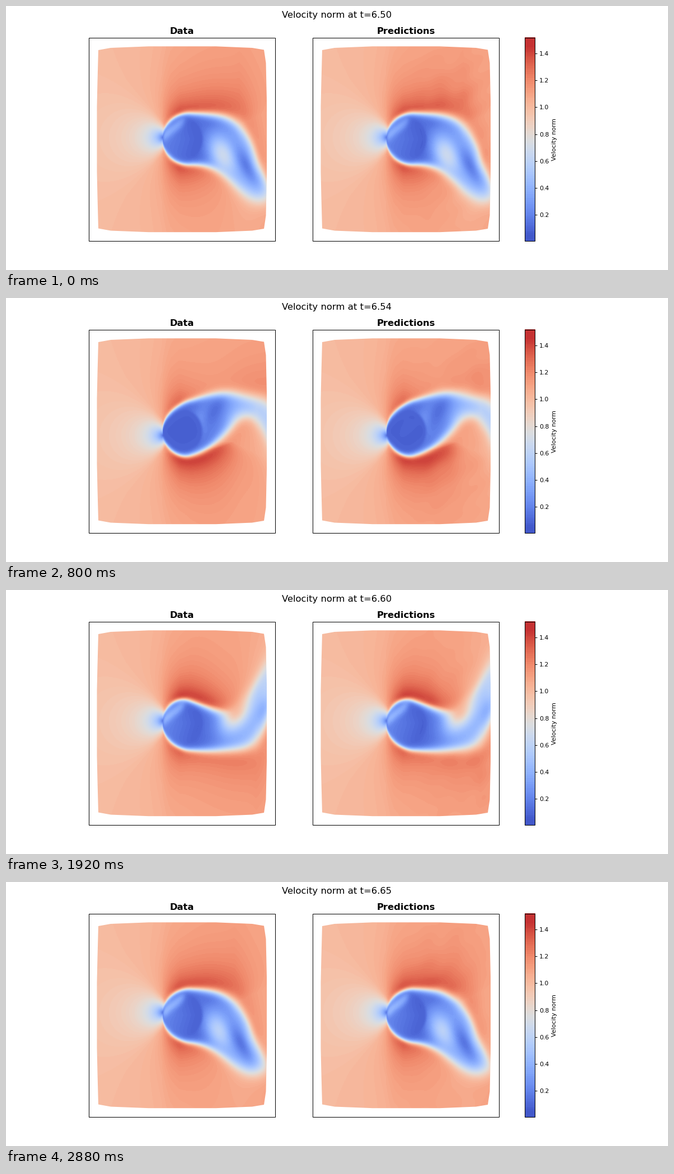
A matplotlib script for the animation above (3040 ms loop, 1183x473 px).

```python
import numpy as np
import matplotlib as mpl
import matplotlib.pyplot as plt
from matplotlib.animation import FuncAnimation
from matplotlib.colors import ListedColormap
from matplotlib.patches import Polygon, Rectangle

W, H, DPI = 1183, 473, 128
PX = 72 / DPI                      # points per pixel
FRAMES, STEP = 19, 160
HALF = 9.4                         # half a shedding cycle, in frames
VMIN, VMAX, BANDS = 0.0045, 1.5185, 100
CX, CY, R = 317, 238.5, 36         # cylinder
LEFT, WIDTH, SHIFT = 147.9, 333.4, 400
TOP, BOTTOM = 56.8, 420.9
BAR_L, BAR_R = 927.2, 945.4

x = np.arange(162, 468) + 0.5
y = np.arange(72, 406) + 0.5
X, Y = np.meshgrid(x, y)
UP = CY - Y
reach = np.clip((x - 290) / 170, 0, 1.1)     # 0 at the cylinder, 1 at the outlet

rng = np.random.default_rng(4)
WAVES = np.column_stack([rng.uniform(.04, .15, 9), rng.uniform(-.16, .16, 9),
                         rng.uniform(0, 2 * np.pi, 9)])


def sig(z):
    return 1 / (1 + np.exp(-z))


def beat(p, peak, period):
    return np.cos(2 * np.pi * (p - peak) / period)


def blob(v, x0, v0, lean, along, across):
    """Slanted Gaussian spot."""
    dx, dv = X - x0, (v - v0) * lean
    a, c = .45 * dx + .89 * dv, .89 * dx - .45 * dv
    return np.exp(-(a / along) ** 2 / 2 - (c / across) ** 2 / 2)


def free_stream(shift):
    """Potential flow past the cylinder, softened on the sides."""
    v = UP - shift * np.clip((310 - X) / 30, 0, 1)
    dx = X - CX
    z2 = (np.where(dx < 0, dx, .35 * dx) + 1j * v * R / 38) ** 2
    w = np.abs(1 - R**2 * np.conj(z2) / np.maximum(np.abs(z2), R**2) ** 2)
    slow = np.where(dx < 0, np.minimum(w, 1), 1)
    return slow + .35 * np.maximum(w - 1, 0) + .08 * sig((X - 290) / 25)


def wake_edges(p):
    """A travelling wave whose width pulses twice per cycle."""
    peak = HALF / 2 - .4 + 4.4 * reach**2
    middle = 86 * reach**1.9 * beat(p, peak, 2 * HALF)
    pulse = 24 * reach**1.3 * beat(p, 6.2 + 5.8 * reach**2, HALF)
    nose = np.sqrt(1 - np.clip((330 - x) / 50, 0, 1) ** 2)
    half = nose * (48 - 19 * reach**3 + pulse)
    return middle + half, middle - half


def crest(p):
    """Speed-up beside the wake, carried downstream."""
    wave = np.tanh(4 * reach) * beat(p, 4.3 + 8.4 * reach**1.5, 2 * HALF)
    return np.clip((x - 262) / 48, 0, 1) * (.19 - .15 * reach + .15 * wave)


def wake_speed(v, p):
    s = .1 + .4 * np.clip((X - 340) / 120, 0, 1.1) ** 1.2
    spot = np.exp(-((X - 355) / 16) ** 2 / 2 - ((v + 28) / 8) ** 2 / 2)
    s += (.12 - s) * spot * np.sin(np.pi * (p - 3) / HALF)
    for q, g in ((p, 1), (p + HALF, -1)):
        pale = np.clip(.3 + .11 * (q - 5.6), .3, 1.05)
        v0 = g * 28 * np.cos((q - 9) / 4.2)
        s += (pale - s) * .9 * blob(v, 388 + 9 * (q - 9.4), v0, g, 25, 15)
        dark = .08 + .07 * max(q - 9.4, 0)
        v0 = g * 52 * np.cos((q - 8.3) / 4.2)
        power = .85 * np.clip((q - 3) / 2.5, 0, 1)
        s += (dark - s) * power * blob(v, 400 + 13.5 * (q - 7), v0, g, 26, 10)
    return s


def body_speed(shift):
    lift = np.clip((shift + 4) / 8, 0, 1)
    slope = np.clip((345 - X - .3 * np.abs(UP)) / 60, 0, 1)
    ray = ((X - 303) * 23 - (UP - 22) * 30) / np.hypot(23, 30)
    streak = np.exp(-(ray / 6) ** 2 / 2) * sig((318 - X) / 3)
    return .08 + .13 * lift * slope + .22 * lift * streak


def fields(i):
    """Speed maps of the data and of the prediction."""
    turn, p = divmod(i - 3, HALF)
    p += 3
    side = 1 if turn % 2 == 0 else -1
    v = side * UP
    shift = -8 * side * beat(p, 5.8, 2 * HALF)

    upper, lower = wake_edges(p)
    over, under = (d / np.hypot(1, np.clip(np.gradient(e, x), -1, 1))
                   for d, e in ((v - upper, upper), (lower - v, lower)))
    soft = 2 + 6 * reach**1.3
    mask = sig(-over / soft) * sig(-under / soft) * (X > 280)

    above, below = (g * np.exp(-np.maximum(d, 0) / 45)
                    for g, d in ((crest(p + HALF), over), (crest(p), under)))
    share = sig((v - (upper + lower) / 2) / 8)
    glow = share * above + (1 - share) * below
    outer = free_stream(shift) + glow

    rho = np.hypot((X - 316) / 35, UP / 38.5)
    body = sig((1 - rho) * 25)
    inner = body * body_speed(shift) + (1 - body) * wake_speed(v, p)
    data = outer * (1 - mask) + inner * mask

    ripple = sum(np.sin(a * (X - 13 * i) + b * Y + c) for a, b, c in WAVES) / 3
    ripple *= .02 * (.3 + 3 * np.maximum(glow, 0)) * sig((X - 345) / 18)
    return data, data + ripple * (1 - .8 * mask)


shades = np.clip((np.arange(BANDS) + .5) / BANDS, .03, .95)
cmap = ListedColormap(mpl.colormaps["coolwarm"](shades))

plt.rcParams["font.family"] = "DejaVu Sans"
fig = plt.figure(figsize=(W / DPI, H / DPI), dpi=DPI, facecolor="white")
ax = fig.add_axes([0, 0, 1, 1])
ax.axis("off")

BIG, SMALL, LINE = 16.43 * PX, 10.95 * PX, PX
# Upper half of the mesh outline; the lower half mirrors it.
rim = [(162.5, 180), (163.5, 135), (165, 79), (187, 75), (255, 72.3),
       (375, 72.3), (440, 75), (461, 78.5), (464.5, 102), (466, 170)]
rim += [(a, 2 * CY + .5 - b) for a, b in rim[::-1]]


def show(values, extent):
    return ax.imshow(values, extent=extent, cmap=cmap, vmin=VMIN, vmax=VMAX,
                     interpolation="nearest", aspect="auto")


def frame(left, right):
    ax.add_patch(Rectangle((left, TOP), right - left, BOTTOM - TOP, fill=False,
                           ec="black", lw=LINE, zorder=3))


def panel(dx, title):
    img = show(np.ones(X.shape), (162 + dx, 468 + dx, 406, 72))
    img.set_clip_path(Polygon([(a + dx, b) for a, b in rim], transform=ax.transData))
    frame(LEFT + dx, LEFT + WIDTH + dx)
    ax.text(LEFT + WIDTH / 2 + dx, 50.2, title, size=BIG, weight="bold",
            ha="center", va="baseline")
    return img


panels = [panel(0, "Data"), panel(SHIFT, "Predictions")]

scale = VMIN + (VMAX - VMIN) * (np.arange(BANDS)[::-1, None] + .5) / BANDS
show(scale, (BAR_L, BAR_R, BOTTOM, TOP))
frame(BAR_L, BAR_R)
for tick in np.arange(.2, 1.5, .2):
    ty = BOTTOM - (tick - VMIN) / (VMAX - VMIN) * (BOTTOM - TOP)
    ax.plot([BAR_R, BAR_R + 3.8], [ty, ty], color="black", lw=LINE,
            solid_capstyle="butt")
    ax.text(BAR_R + 7.7, ty, f"{tick:.1f}", size=SMALL, va="center_baseline")
ax.text(980.3, (TOP + BOTTOM) / 2, "Velocity norm", size=SMALL, rotation=90,
        ha="center", va="center")
heading = ax.text(W / 2, .02 * H, "", size=BIG, ha="center", va="top")

ax.set_xlim(0, W)
ax.set_ylim(H, 0)


def draw(i):
    for img, values in zip(panels, fields(i)):
        img.set_data(values)
    heading.set_text(f"Velocity norm at t={6.502 + .0084 * i:.2f}")
    return [*panels, heading]


anim = FuncAnimation(fig, draw, frames=FRAMES, interval=STEP,
                     init_func=lambda: draw(0), repeat=True, repeat_delay=0)
plt.show()
```
